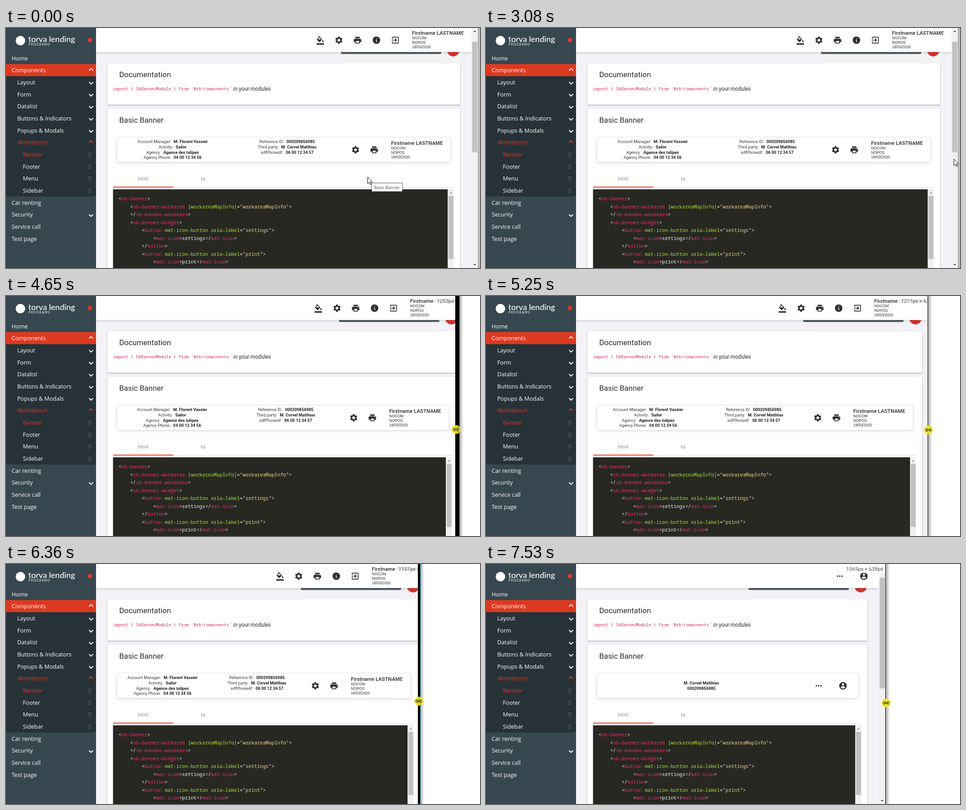
Write an HTML page that moves like this. It is 1053 px wide and 532 px high and loops after 8 s.

```html
<!DOCTYPE html>
<html lang="en">
<head>
<meta charset="utf-8">
<title>Responsive banner</title>
<style>
html, body { margin: 0; width: 100%; height: 100%; overflow: hidden; background: #fff; }
svg { display: block; }
text { white-space: pre; font-family: Roboto, sans-serif; fill: #2b2b2b; }
.nav { font: 12.65px "Open Sans", sans-serif; fill: #fff; }
.hot { fill: #dc3a21; }
.flag { font-weight: 600; fill: #55626a; text-anchor: middle; }
.brand { font: 500 18px Lato, sans-serif; fill: #fff; }
.tag { font: 7px Lato, sans-serif; letter-spacing: 1.2px; fill: #fff; }
.title { font-size: 16.85px; }
.body { font-size: 11.85px; }
.import { font: 9.33px "Noto Sans Mono", monospace; fill: #d4265e; }
.pair { font-size: 9.2px; text-anchor: middle; fill: #3a3a3a; }
.bold { font-weight: 700; fill: #1f1f1f; }
.name { font-size: 11.5px; font-weight: 500; }
.small { font: 8.33px "Liberation Sans", sans-serif; }
.tab { font-size: 11.7px; text-anchor: middle; fill: #8c8c8c; }
.code { font: 500 10.69px "Noto Sans Mono", monospace; fill: #f8f8f2; }
.tip { font: 9.3px "Open Sans", sans-serif; fill: #444; }
.size { font-size: 11.7px; text-anchor: end; fill: #555; }
.card { fill: #fff; filter: drop-shadow(0 1px .8px #0004) drop-shadow(0 1px 1.5px #0002); }
.float { fill: #fff; filter: drop-shadow(0 1px 3px #0003); }
.icon { fill: #303030; }
</style>
</head>
<body>
<svg id="stage" width="1053" height="532" viewBox="0 0 1053 532"></svg>
<script>
const LOOP = 8000, FULL = 1048.5, DRAG = 4020;

const ICONS = {
  fill: 'M16.56 8.94L7.62 0 6.21 1.41l2.38 2.38-5.15 5.15c-.59.59-.59 1.54 0 2.12l5.5 5.5c.29.29.68.44 1.06.44s.77-.15 1.06-.44l5.5-5.5c.59-.58.59-1.53 0-2.12zM5.21 10L10 5.21 14.79 10zM19 11.5s-2 2.17-2 3.5c0 1.1.9 2 2 2s2-.9 2-2c0-1.33-2-3.5-2-3.5zM2 20h20v4H2z',
  gear: gearPath(),
  print: 'M19 8H5c-1.66 0-3 1.34-3 3v6h4v4h12v-4h4v-6c0-1.66-1.34-3-3-3zm-3 11H8v-5h8zm3-7c-.55 0-1-.45-1-1s.45-1 1-1 1 .45 1 1-.45 1-1 1zm-1-9H6v4h12z',
  info: 'M12 2a10 10 0 100 20 10 10 0 000-20zm1 15h-2v-6h2zm0-8h-2V7h2z',
  exit: 'M10.09 15.59L11.5 17l5-5-5-5-1.41 1.41L12.67 11H3v2h9.67zM19 3H5c-1.11 0-2 .9-2 2v4h2V5h14v14H5v-4H3v4c0 1.1.89 2 2 2h14c1.1 0 2-.9 2-2V5c0-1.1-.9-2-2-2z',
  more: [6, 12, 18].map(x => `M${x - 2} 12a2 2 0 104 0 2 2 0 10-4 0z`).join(''),
  account: 'M12 2a10 10 0 100 20 10 10 0 000-20zm0 3a3 3 0 110 6 3 3 0 010-6zm0 14.2c-2.5 0-4.71-1.28-6-3.22.03-1.99 4-3.08 6-3.08s5.97 1.09 6 3.08c-1.29 1.94-3.5 3.22-6 3.22z'
};

function gearPath() {
  const points = [];
  for (let k = 0; k < 6; k++)
    for (const [r, a] of [[7.2, -23], [9.9, -14], [9.9, 14], [7.2, 23]]) {
      const angle = (k * 60 + a) * Math.PI / 180;
      points.push(`${(12 + r * Math.sin(angle)).toFixed(2)} ${(12 - r * Math.cos(angle)).toFixed(2)}`);
    }
  return `M${points.join('L')}zM12 8.4a3.6 3.6 0 100 7.2 3.6 3.6 0 000-7.2z`;
}

const text = (x, y, s, cls) => `<text x="${x}" y="${y}" class="${cls}">${s}</text>`;
const rect = (x, y, w, h, fill, more = '') => `<rect x="${x}" y="${y}" width="${w}" height="${h}" fill="${fill}" ${more}/>`;
const icon = (name, x, y) => `<path class="icon" fill-rule="evenodd" d="${ICONS[name]}" transform="translate(${x - 10} ${y - 10}) scale(.8333)"/>`;
// data-shift: share of the width change added to x; data-wide: base width that follows the page
const shift = (k, body, cls = '') => `<g data-shift="${k}" class="${cls}">${body}</g>`;
const wide = (x, y, w, h, fill, more = '') => rect(x, y, w, h, fill, `data-wide="${w}" ${more}`);

const user = (x, y) => text(x, y, 'Firstname LASTNAME', 'name') +
  ['NOCOM', 'NOPOS', '18/03/2020'].map((s, i) => text(x, y + 10 + i * 10, s, 'small')).join('');

const pairs = (x, rows) => rows.map(([label, value], i) =>
  text(x, 255.3 + i * 11.65, `${label}: <tspan class="bold" dx="3.6">${value}</tspan>`, 'pair')).join('');

function highlight(line) {
  let inTag = false, inString = false, tagName = false;
  return line.match(/<\/?|[>="]|\s+|[^<>="\s]+/g).map(token => {
    let color = '';
    if (token[0] === '<') inTag = tagName = true;
    else if (token === '>') inTag = false;
    else if (token === '"') inString = !inString;
    else if (inString) color = '#f0d88a';
    else if (tagName) { color = '#f92672'; tagName = false; }
    else if (inTag && token !== '=') color = '#a6e22e';
    const safe = token.replace('<', '&lt;');
    return color ? `<tspan style="fill:${color}">${safe}</tspan>` : safe;
  }).join('');
}

function chevron(y, up, color) {
  const d = up ? `M184.5 ${y + .7}l4.5-4.5 4.5 4.5` : `M184.5 ${y - .5}l4.5 4.5 4.5-4.5`;
  return `<path d="${d}" fill="none" stroke="${color}" stroke-width="2"/>`;
}

function sidebar() {
  const items = [
    ['Home', 0], ['Components', 0, 'up'], ['Layout', 1, 'down'], ['Form', 1, 'down'],
    ['Datalist', 1, 'down'], ['Buttons &amp; Indicators', 1, 'down'], ['Popups &amp; Modals', 1, 'down'],
    ['Workbench', 1, 'up'], ['Banner', 2, 'S'], ['Footer', 2, 'S'], ['Menu', 2, 'S'], ['Sidebar', 2, 'S'],
    ['Car renting', 0], ['Security', 0, 'down'], ['Service call', 0], ['Test page', 0]
  ];
  const rows = items.map(([label, level, mark], i) => {
    const y = 67 + i * 26.67, hot = label === 'Workbench' || label === 'Banner';
    let out = text(12.5 + level * 12.5, y + 4.6, label, hot ? 'nav hot' : 'nav');
    if (mark === 'S') out += text(186, y + 4.6, 'S', 'nav flag');
    else if (mark) out += chevron(y, mark === 'up', hot ? '#dc3a21' : '#fff');
    return out;
  });
  return rect(0, 0, 200, 532, '#37474f') + rect(0, 106.5, 200, 267, '#263238') + rect(0, 80, 200, 26.7, '#dc3a21') +
    '<circle cx="32" cy="28" r="10.5" fill="#fff"/><circle cx="186.5" cy="27" r="5" fill="#e0341d"/>' +
    text(49.5, 31, 'torva lending', 'brand') + text(50, 38.5, 'PROGRAMS', 'tag') + rows.join('');
}

function page() {
  const code = [
    [0, '<sb-banner>'],
    [1, '<sb-banner-workarea [workareaMapInfo]="workareaMapInfo">'],
    [1, '</sb-banner-workarea>'],
    [1, '<sb-banner-widget>'],
    [2, '<button mat-icon-button aria-label="settings">'],
    [3, '<mat-icon>settings</mat-icon>'],
    [2, '</button>'],
    [2, '<button mat-icon-button aria-label="print">'],
    [3, '<mat-icon>print</mat-icon>'],
    [2, '</button>']
  ].map(([indent, line], i) => text(250 + indent * 25.66, 382 + i * 17.5, highlight(line), 'code')).join('');

  const content = rect(200, 0, 853, 532, '#f3f2f7') +
    shift(1, rect(744, 30, 223, 27.5, '#4a565f', 'rx="3"') + '<circle cx="993.5" cy="49.5" r="13.5" fill="#d6322f"/>') +
    wide(225, 78, 784, 92, '#fff', 'rx="2" class="card"') +
    text(251.5, 109, 'Documentation', 'title') +
    text(238, 138.3, "import { SbBannerModule } from '@sb/components'", 'import') +
    text(505, 138.5, 'in your modules', 'body') +
    wide(225, 179, 784, 380, '#fff', 'rx="2" class="card"') +
    text(251.5, 210, 'Basic Banner', 'title');

  const banner = wide(247, 243, 740.5, 54, '#fff', 'rx="2" class="float"') +
    shift(.25, pairs(370, [['Account Manager', 'M. Florent Vassier'], ['Activity', 'Sailor'],
      ['Agency', 'Agence des tulipes'], ['Agency Phone', '04 00 12 34 56']]), 'full') +
    shift(.75, pairs(624.5, [['Reference ID', '000209856985'], ['Third party', 'M. Corvel Matthias'],
      ['sdfPhonedf', '06 00 12 34 57']]), 'full') +
    shift(1, icon('gear', 776.5, 270) + icon('print', 818, 270) + user(855.5, 258.7), 'full') +
    shift(.5, text(559, 267.2, 'M. Corvel Matthias', 'pair bold') + text(559, 278.7, '000209856985', 'pair bold'), 'compact') +
    shift(1, icon('more', 900, 270) + icon('account', 954, 270), 'compact');

  const source = text(304.5, 337.5, 'html', 'tab') + text(438, 337.5, 'ts', 'tab') +
    wide(238, 353, 757, 1, '#dcdcdc') + rect(238, 351.7, 133.5, 1.8, '#e0341d') +
    wide(237.7, 357.5, 743.8, 180, '#272822') + code +
    shift(1, rect(981.5, 357.5, 13.5, 180, '#f1f1f1') + rect(983, 372, 11, 140, '#c1c1c1') +
      '<path d="M985 367l3.3-3.5 3.3 3.5z" fill="#a0a0a0"/>');

  const header = wide(200, 0, 834, 53.3, '#fff', 'class="float"') +
    shift(1, icon('fill', 698, 27) + icon('gear', 739.5, 27) + icon('print', 781, 27) +
      icon('info', 823, 27) + icon('exit', 865, 27) + user(902, 15), 'full') +
    shift(1, icon('more', 947, 27) + icon('account', 1000.5, 27), 'compact');

  const scrollbar = shift(1, rect(1034, 0, 15, 532, '#f1f1f1') + rect(1035.5, 30.5, 11.5, 245, '#c1c1c1') +
    '<path d="M1038 9l3.2-3.5 3.2 3.5zM1038 523l3.2 3.5 3.2-3.5z" fill="#505050"/>');

  const size = shift(1, rect(955.5, 0, 94, 20, '#fff', 'opacity=".8"') +
    '<text id="size" x="1043.5" y="15" class="size"></text>');

  return content + banner + source + header + scrollbar + `<g id="overlay">${size}</g>` + sidebar();
}

const $ = id => document.getElementById(id);
$('stage').innerHTML = `
  <defs><linearGradient id="fade"><stop stop-opacity=".35"/><stop offset="1" stop-opacity="0"/></linearGradient></defs>
  <svg id="page" height="532">${page()}</svg>
  ${rect(0, 0, 0, 532, '#000', 'id="band"')}
  <g id="edge">${rect(0, 0, 9, 532, 'url(#fade)')}${rect(0, 0, 1, 532, '#1b88a8', 'id="rim"')}</g>
  <g id="tip">${rect(.5, .5, 68, 19, '#fff', 'stroke="#555"')}${text(6.3, 13.7, 'Basic Banner', 'tip')}</g>
  <g id="pointer" stroke="#000" fill="#fff">
    <path id="arrow" d="M.5.5V15.2L4 12 6.2 17.3 8.4 16.3 6.2 11.2H10.7z"/>
    <path id="hand" d="M-2 11V1Q-.5-1.2 1 1V6.5Q3 5.5 4 7.5 6 6.5 6.5 8.5 8.5 8 8.7 10V13.5Q8.5 16 7 18.5H-.5Q-2 15.5-5 12-5 9-2 11z"/>
    <g id="resize"><circle id="press" r="10" fill="#f4e81e" opacity=".88" stroke="none"/>
    <path d="M-7.5 0l3.7-3.7v2.7h7.6v-2.7L7.5 0l-3.7 3.7v-2.7h-7.6v2.7z" fill="#f6ee4a"/></g>
  </g>`;

const PATH = [
  [0, 803, 330], [750, 803, 330], [1250, 823, 264], [1650, 823, 264], [2080, 772, 263], [2280, 772, 263],
  [3060, 1039, 290], [3260, 1039, 290], [3550, 1050, 297], [DRAG, 1050, 297], [4300, 1047, 297], [4650, 1000, 296],
  [4790, 994, 296], [5020, 983, 297], [5250, 983, 297], [5620, 957, 299], [5750, 951, 300], [5890, 951, 300],
  [6360, 917, 304], [6650, 904, 305], [6700, 904, 305], [7220, 889, 308], [LOOP, 889, 308]
];
// the page re-flows in hops behind the dragged edge
const WIDTHS = [[0, FULL], [4450, 1044.3], [4720, 1009], [5400, 981.7], [6100, 959.2], [6900, 904], [7530, 887.5]];

function pointerAt(t) {
  const i = PATH.findIndex(p => p[0] > t), [t0, x0, y0] = PATH[i - 1], [t1, x1, y1] = PATH[i];
  let u = (t - t0) / (t1 - t0);
  if (t < DRAG) u = u * u * (3 - 2 * u);
  return [x0 + (x1 - x0) * u, y0 + (y1 - y0) * u];
}

const shifted = document.querySelectorAll('[data-shift]');
const widened = document.querySelectorAll('[data-wide]');
const show = (el, on) => { el.style.display = on ? '' : 'none'; };
const move = (el, x, y) => el.setAttribute('transform', `translate(${x} ${y})`);

function layout(width) {
  const delta = width - FULL;
  shifted.forEach(el => move(el, delta * el.dataset.shift, 0));
  widened.forEach(el => el.setAttribute('width', +el.dataset.wide + delta));
  document.querySelectorAll('.full').forEach(el => show(el, width > 930));
  document.querySelectorAll('.compact').forEach(el => show(el, width <= 930));
  $('size').textContent = `${Math.round(width * 1.2)}px × 638px`;
}

let lastWidth;
function draw(now) {
  const t = now % LOOP;
  const width = WIDTHS.filter(w => w[0] <= t).pop()[1];
  if (width !== lastWidth) layout(lastWidth = width);
  show($('overlay'), t >= DRAG);

  const [x, y] = pointerAt(t);
  const clip = Math.round(pointerAt(Math.max(t, DRAG))[0]) - 2;
  const edge = Math.round(pointerAt(Math.max(t - 60, DRAG))[0]) - 1;
  $('page').setAttribute('width', clip);
  $('band').setAttribute('x', clip);
  $('band').setAttribute('width', edge - clip);
  $('band').setAttribute('opacity', t < DRAG ? .3 : 1);
  move($('edge'), edge, 0);
  show($('rim'), edge - clip > 3);

  const resizing = t > 3450;
  const onIcon = Math.abs(y - 270) < 20 && (Math.abs(x - 776.5) < 20 || Math.abs(x - 818) < 20);
  move($('pointer'), Math.round(x), Math.round(y));
  show($('resize'), resizing);
  show($('press'), t > 3560);
  show($('hand'), !resizing && onIcon);
  show($('arrow'), !resizing && !onIcon);

  show($('tip'), t < 750 || (t >= 1370 && t < 1650));
  move($('tip'), Math.round(x) + 9, Math.round(y) + 13);
  requestAnimationFrame(draw);
}
requestAnimationFrame(draw);
</script>
</body>
</html>
```
